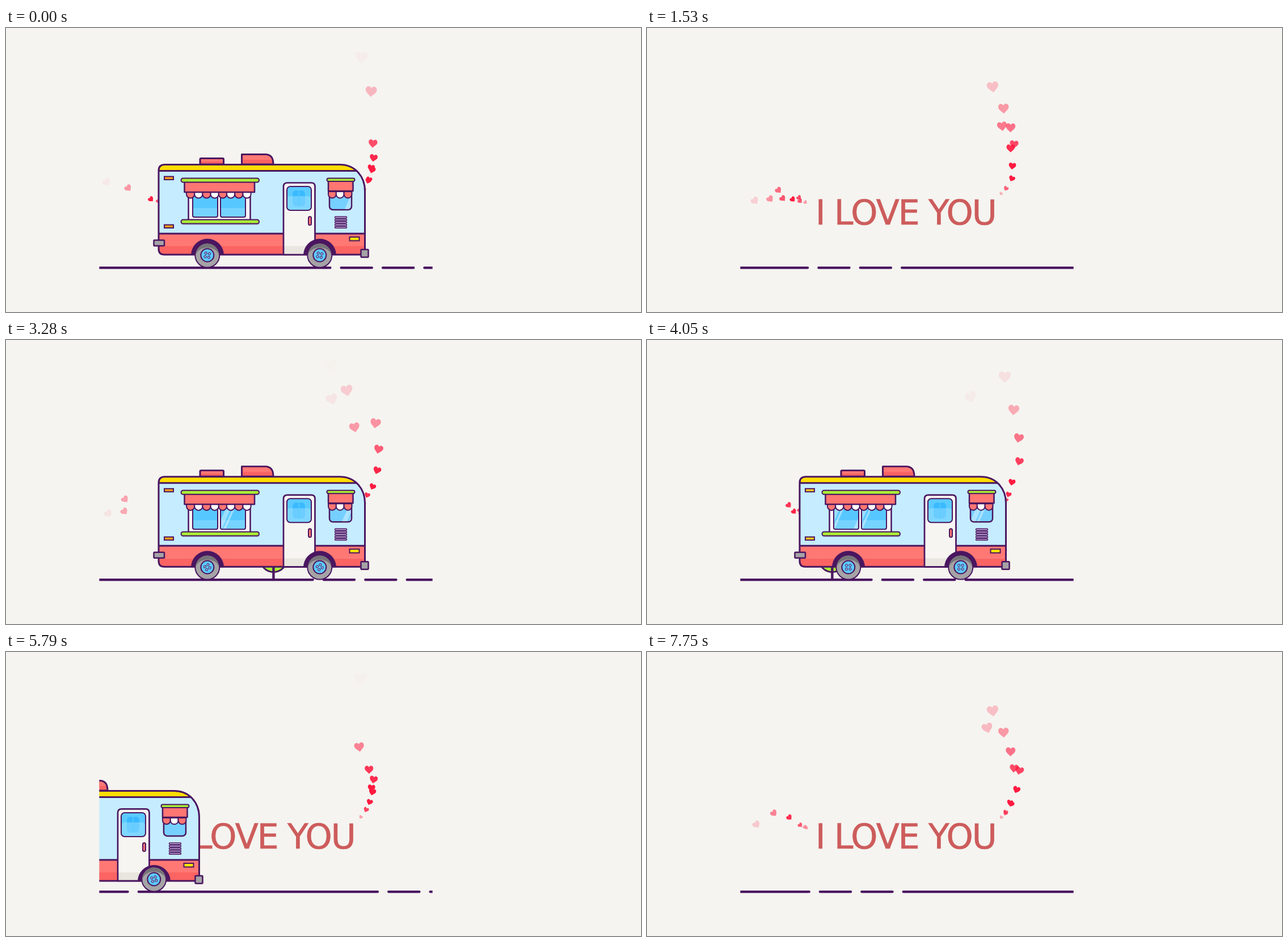
These frames come from a looping animation (1119 px wide and 500 px high, 7820 ms). An HTML page:

```html
<!DOCTYPE html>
<html lang="en">
<head>
<meta charset="utf-8">
<title>Love van</title>
<style>
html, body { margin: 0; width: 100%; height: 100%; overflow: hidden; background: #f5f4f0; }
svg { display: block; width: 100%; height: 100%; }
.o { stroke: #4a1660; stroke-width: 3; stroke-linejoin: round; }
.t { stroke: #4a1660; stroke-width: 2; }
.n { fill: none; }
</style>
</head>
<body>
<svg viewBox="0 0 1119 500">
  <defs>
    <clipPath id="stage"><rect x="164.4" width="587.2" height="500"/></clipPath>
    <clipPath id="bodyClip"><path id="bodyShape" d="M269 251Q269 240.5 280 240.5H588C615 240.5 632.5 261 632.5 287V399H279Q269 399 269 389Z"/></clipPath>
    <clipPath id="panes"><rect x="330" y="296" width="42" height="36"/><rect x="379" y="296" width="42" height="36"/></clipPath>
    <clipPath id="front"><rect x="571" y="290" width="37" height="29" rx="5"/></clipPath>
    <g id="stripes" fill="#fff" opacity=".4"><path d="M6 294h9l-18 40h-9z"/><path d="M18 294h4l-18 40h-4z"/></g>
    <g id="wheelBase">
      <circle r="21.5" fill="#a5a3a6" class="t"/>
      <path d="M-20.5 0A20.5 20.5 0 0 1 20.5 0A20.8 16 0 0 0 -20.5 0Z" fill="#767479"/>
    </g>
  </defs>
  <g clip-path="url(#stage)">
    <g id="hearts" fill="#ff1a40"></g>
    <text x="297" y="346" font-family="'DejaVu Sans', sans-serif" font-size="60" letter-spacing="-1.9" fill="#cd5c5c" stroke="#cd5c5c" stroke-width=".7">I LOVE YOU</text>
    <path id="road" d="M-436.9 422.1H1400" stroke="#4a1260" stroke-width="4.2" stroke-linecap="round" stroke-dasharray="421.4 19 54.4 19 54.4 19"/>
    <g id="tree">
      <g class="o" fill="#aaee35"><circle cy="353" r="16"/><circle cy="385" r="23.5"/></g>
      <g fill="#aaee35"><circle cy="353" r="14.5"/><circle cy="385" r="22"/></g>
      <path class="o n" stroke-linecap="round" d="M0 397L14 384M0 374L7 367M0 387L-9 378"/>
      <path class="o n" style="stroke-width:4.4" stroke-linecap="round" d="M0 349V420"/>
    </g>
    <g id="van">
      <g id="body">
        <path class="o" fill="#f96363" d="M342 240V231Q342 229.5 343.5 229.5H382Q383.5 229.5 383.5 231V240Z"/>
        <path fill="#ff7874" d="M344 231h38v4h-38z"/>
        <path class="o" fill="#f96363" d="M415.5 240V222.5H457Q471 222.5 471 240Z"/>
        <path fill="#ff7874" d="M417 224H458Q466 225 468.5 232H417Z"/>
        <g clip-path="url(#bodyClip)">
          <path fill="#c6ecff" d="M260 235h380v170H260z"/>
          <path fill="#ffdd00" d="M260 235h380v16H260z"/>
          <path fill="#ff7874" d="M260 362h380v22H260z"/>
          <path fill="#fb6462" d="M260 384h380v20H260z"/>
          <path class="o" d="M260 251.5h380M260 362h380"/>
        </g>
        <use href="#bodyShape" class="o n"/>
        <path id="tail" class="t" d="M279 261.5h16v5.5h-16zM279 346.5h16v5.5h-16z"/>
        <path class="t" fill="#ffe600" d="M605.5 368h17v6.5h-17z"/>

        <rect class="t" x="321.5" y="288" width="109" height="50" fill="#f7f3f8" style="stroke-width:2.5"/>
        <g fill="#76d3ff" class="t"><rect x="329" y="290" width="44" height="43" rx="3"/><rect x="378" y="290" width="44" height="43" rx="3"/></g>
        <path fill="#57c8ff" d="M330 291h42v26h-42zM379 291h42v26h-42z"/>
        <g clip-path="url(#panes)"><use id="glintA" href="#stripes"/><use id="glintB" href="#stripes"/></g>
        <rect x="309" y="339" width="138" height="8" rx="4" fill="#4a1660" opacity=".15"/>
        <rect class="t" x="308.5" y="337.5" width="137.5" height="7" rx="3.5" fill="#aaee35"/>
        <g id="bigFringe" class="t"></g>
        <rect class="o" x="314.5" y="271" width="123.5" height="18" fill="#ff7672" style="stroke-width:2.5"/>
        <rect class="t" x="308.5" y="264.5" width="137.5" height="7" rx="3.5" fill="#aaee35"/>

        <rect x="570" y="285" width="39" height="35" rx="6" fill="#76d0ff" class="o" style="stroke-width:2.5"/>
        <g clip-path="url(#front)"><use id="glintC" href="#stripes"/></g>
        <g id="smallFringe" class="t"></g>
        <rect class="o" x="568" y="269" width="43.5" height="18" fill="#ff7672" style="stroke-width:2.5"/>
        <rect class="t" x="565.5" y="264.5" width="49" height="5.5" rx="2.7" fill="#aaee35"/>
        <g id="vents" fill="#d9c8ee" stroke="#4a1660" stroke-width="1.5"></g>

        <path fill="#f7f5f2" d="M489 399V279Q489 272.5 496 272.5H538Q544.5 272.5 544.5 279V399Z"/>
        <path fill="#e9e6e0" d="M489 384h55v15h-55z"/>
        <path class="o n" style="stroke-width:2.7" d="M489 399V279Q489 272.5 496 272.5H538Q544.5 272.5 544.5 279V399Z"/>
        <rect x="495" y="279" width="43" height="42" rx="6" fill="#5ccbff"/>
        <rect x="505" y="286" width="22" height="28" rx="6" fill="#3abaff"/>
        <rect x="496" y="296" width="41" height="24" rx="5" fill="#b5e8ff" opacity=".4"/>
        <path d="M516 286v28" stroke="#5ccbff" stroke-width="1.5"/>
        <rect class="t n" x="495" y="279" width="43" height="42" rx="6"/>
        <rect class="t" x="533" y="332" width="5" height="15" rx="2.5" fill="#ff7672"/>

        <g fill="#a5a3a6" class="t" style="stroke-width:2.5"><rect x="260.5" y="373.5" width="18.5" height="10" rx="1"/><rect x="625.5" y="390" width="13" height="13.5" rx="1"/></g>
        <path fill="#4a1660" d="M326 400a29 29 0 0 1 58 0zM524 400a29 29 0 0 1 58 0z"/>
      </g>
      <g id="wheels"></g>
    </g>
  </g>
</svg>
<script>
const LOOP = 7820, CYCLE = 3117, SPEED = 0.1884, SPAN = 587.2;
const $ = id => document.getElementById(id);
const move = (id, x, y = 0) => $(id).setAttribute("transform", `translate(${x} ${y})`);
const clamp = v => Math.max(0, Math.min(1, v));

function fringe(id, x, n, w) {
  const r = w / 2;
  for (let i = 0; i < n; i++) {
    $(id).innerHTML += `<path fill="${i % 2 ? "#fff" : "#ff7672"}" d="M${x + i * w} 288v4.5a${r} ${r} 0 0 0 ${w} 0v-4.5z"/>`;
  }
}
fringe("bigFringe", 318, 8, 14.2);
fringe("smallFringe", 568, 3, 13.8);

for (let i = 0; i < 5; i++) {
  $("vents").innerHTML += `<rect x="579.5" y="${332 + i * 4.4}" width="21" height="2.7" rx="1.3"/>`;
}

const bolts = [45, 135, 225, 315].map(a => `<circle cx="4.5" r="2" transform="rotate(${a})"/>`).join("");
$("wheels").innerHTML = [354.8, 552.8].map(x => `<g transform="translate(${x} 400)">
  <use href="#wheelBase"/><circle r="11.5" fill="#5ccbff" class="t"/>
  <g class="hub" fill="#8fc9f2" stroke="#4a1660" stroke-width="1">${bolts}</g></g>`).join("");
const hubs = document.querySelectorAll(".hub");

// A trail sends volleys of `count` hearts, `step` ms apart, one volley every `every` ms.
// Its curve bows sideways by `bow` and drifts off by `lean`.
const up = { reach: 250, fade: 7.5, end: 15.8, size: 5, grow: 1.1, tilt: 38, bow: 32,
  place: (d, side) => [621 + side, 293 - d] };
const back = { reach: 111, fade: 5, end: 10.5, size: 5.5, grow: 0.85, tilt: -48, turn: 1,
  place: (d, side) => [282 - d, 311 - side] };
const quickBack = { ...back, rate: 0.0039, bow: 17, lean: 42, count: 2, step: 530, every: 5220 };
const trails = [
  { ...up, rate: 0.0039, bow: 35, lean: 3, turn: -2.4, start: 180, count: 4, step: 530, every: 5220 },
  { ...up, rate: 0.0028, lean: -50, turn: -3.4, start: 2840, count: 4, step: 520, every: 6220 },
  { ...up, rate: 0.0027, lean: -112, turn: -4.2, fade: 8.5, end: 14.1, start: 1640, count: 3, step: 720, every: 4165 },
  { ...quickBack, start: 574 },
  { ...quickBack, start: 2600 },
  { ...quickBack, rate: 0.0029, start: 3270, count: 1, every: 4180 },
  { ...back, rate: 0.0029, bow: 10, lean: 4, start: 2400, count: 5, step: 525, every: 4170 }
];

function births({ start, count, step, every }) {
  const list = [];
  for (let v = start - 2 * every; v < LOOP; v += every) {
    for (let i = 0; i < count; i++) list.push(v + i * step);
  }
  return list;
}

const hearts = trails.flatMap(trail => births(trail).map(birth => {
  const el = document.createElementNS("http://www.w3.org/2000/svg", "path");
  el.setAttribute("d", "M0 .48C-.2 .25-.5 .1-.5-.16C-.5-.5-.1-.55 0-.28C.1-.55 .5-.5 .5-.16C.5 .1 .2 .25 0 .48Z");
  $("hearts").append(el);
  return { el, trail, birth };
}));

function drawHeart({ el, trail, birth }, t) {
  const q = trail.rate * (t - birth);
  const alpha = q < 0 ? 0 : Math.min(clamp(0.1 + q * 0.18), clamp((trail.end - q) / (trail.end - trail.fade)));
  el.setAttribute("opacity", alpha);
  if (!alpha) return;
  const d = q * q, s = d / trail.reach;
  const [x, y] = trail.place(d, trail.bow * Math.sin(Math.PI * s ** 0.7) + trail.lean * s * s);
  el.setAttribute("transform",
    `translate(${x} ${y}) rotate(${trail.tilt + trail.turn * q}) scale(${trail.size + trail.grow * q})`);
}

// Waits, speeds off to the right, then rolls in again from the left.
function vanX(p) {
  if (p < 940) return 0;
  if (p < 1375) return 500 * ((p - 940) / 435) ** 2;
  if (p < 2560) return 1000;
  return -490 * (1 - clamp((p - 2560) / 500)) ** 2;
}

function draw(t) {
  const p = t % CYCLE;
  hearts.forEach(h => drawHeart(h, t));
  move("road", -(SPEED * t % SPAN));
  move("tree", 616.7 - SPEED * (t - 2510));
  move("van", vanX(p));
  move("body", 0, 4 * Math.max(0, -Math.cos(2 * Math.PI * t / 770)));
  hubs.forEach(h => h.setAttribute("transform", `rotate(${10 + 0.5085 * t})`));

  const glint = 354 - 6 * ((p - 550) / 230) ** 3;
  move("glintA", glint);
  move("glintB", glint + 49);
  move("glintC", 602 - 27 * p / 933);
  const glow = 0.5 - 0.5 * Math.cos(2 * Math.PI * t / 1640);
  $("tail").setAttribute("fill", `rgb(255 ${158 + 42 * glow} 28)`);
}

function tick() {
  draw(performance.now() % LOOP);
  requestAnimationFrame(tick);
}
tick();
</script>
</body>
</html>
```
